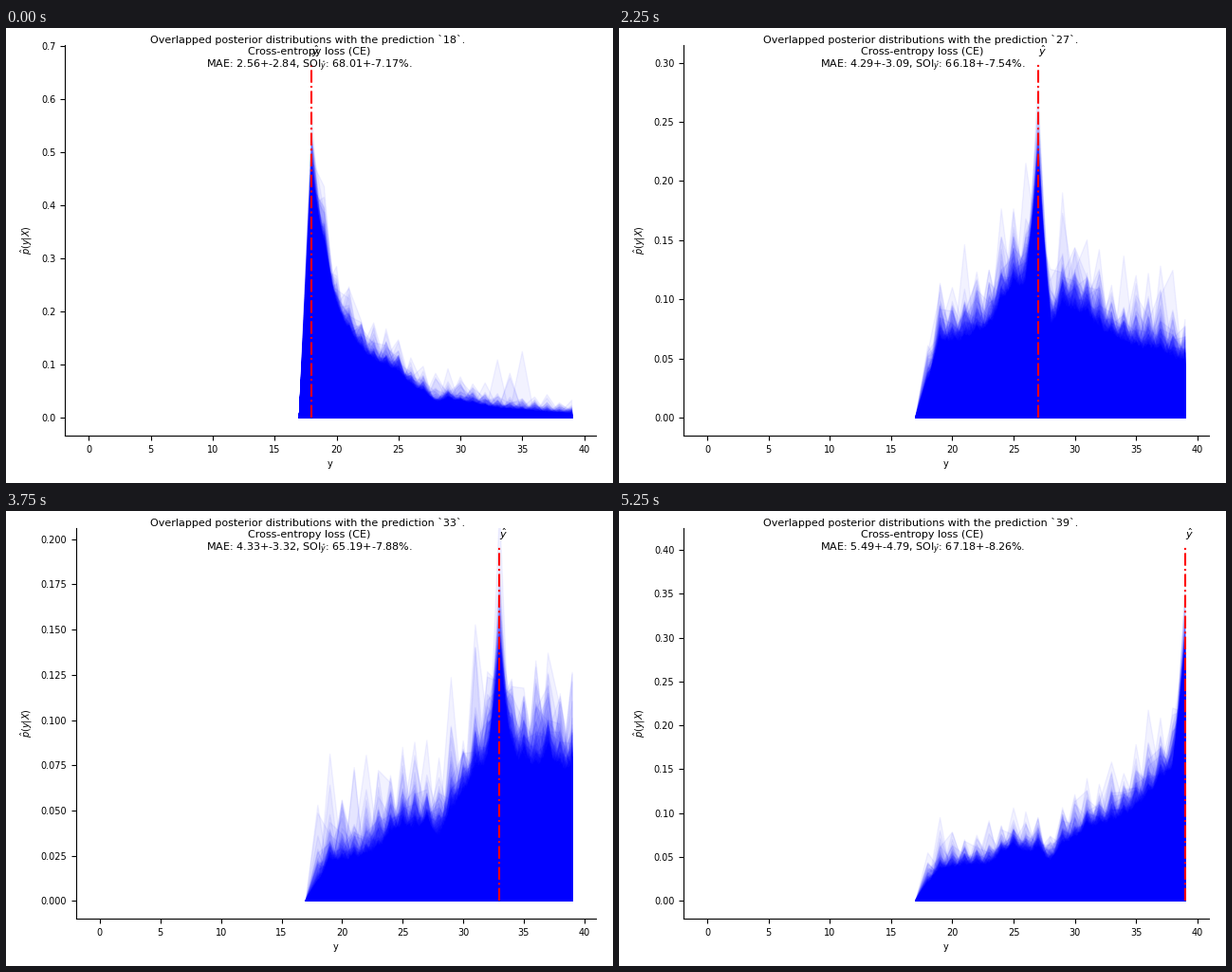
A matplotlib script for the animation above (5.5 s loop, 640 px wide and 480 px high).

```python
import numpy as np
import matplotlib.pyplot as plt
from matplotlib.animation import FuncAnimation
from matplotlib.collections import PolyCollection

WIDTH, HEIGHT, DPI = 640, 480, 100
RIGHT, TOP, BOTTOM = 622, 18, 430
FIRST, LAST = 18, 39
CURVES = 300
YS = np.arange(FIRST, LAST + 1)

KEYS = [18, 22, 25, 29, 31, 35, 39]
# Typical density beside the peak, at the low end and at the high end.
PLATEAU = [.29, .128, .14, .075, .07, .085, .15]
LOW_END = [.12, .115, .095, .02, .025, .015, .034]
HIGH_END = [.007, .02, .058, .034, .06, .085, .12]

MAE = [2.56, 3.75, 4.03, 4.56, 4.29, 4.38, 5.49]
MAE_SD = [2.84, 3.97, 3.40, 2.79, 2.93, 3.71, 4.79]
SOI = [68.01, 66.84, 66.60, 65.76, 64.33, 66.05, 67.18]
SOI_SD = [7.17, 8.75, 8.13, 6.95, 7.82, 7.95, 8.26]

# Height of the prediction line.
LINE_TOPS = {18: .668, 21: .42, 22: .3216, 25: .3955, 29: .2043,
             31: .1751, 34: .207, 35: .1964, 39: .4046}
# Values of y that are commoner or rarer for every prediction.
TEXTURE = {18: .5, 19: 1.1, 24: 1.15, 25: 1.2, 28: .72, 31: 1.1, 37: 1.1}
texture = np.array([TEXTURE.get(y, 1) for y in YS])

plt.rcParams.update({
    "font.family": "DejaVu Sans", "font.size": 8,
    "axes.labelsize": 7, "xtick.labelsize": 7, "ytick.labelsize": 7,
    "axes.spines.top": False, "axes.spines.right": False,
})


def at(prediction, values):
    return np.interp(prediction, KEYS, values)


def posterior_curves(prediction, line_top):
    """Random curves around a plateau that decays away from the peak."""
    plateau = at(prediction, PLATEAU)
    below = YS < prediction
    end = np.where(below, at(prediction, LOW_END), at(prediction, HIGH_END))
    reach = np.abs(prediction - np.where(below, FIRST + 1, LAST)) - 1
    away = (np.abs(YS - prediction) - 1) / np.maximum(reach, 1)
    body = plateau * (end / plateau) ** np.clip(away, 0, 1) ** 0.8 * texture
    body[prediction - FIRST] = 0.66 * line_top

    spread = np.minimum(0.75, 0.075 / np.sqrt(body))
    noise = np.random.default_rng(prediction).normal(size=(CURVES, len(YS)))
    return body * np.exp(spread * (noise - 0.8))


def decimals(line_top):
    return 1 if line_top > 0.41 else 2 if line_top > 0.2045 else 3


fig = plt.figure(figsize=(WIDTH / DPI, HEIGHT / DPI), dpi=DPI, facecolor="white")
ax = fig.add_axes([0.1, 0.1, 0.8, 0.8])
title = fig.text(0.5, 1 - 7 / HEIGHT, "", ha="center", va="top")
fig.text(22 / WIDTH, 1 - 224 / HEIGHT, r"$\hat{p}(y|X)$",
         ha="center", va="center", rotation=90, fontsize=7)


def draw(frame):
    prediction = FIRST + frame
    line_top = np.interp(prediction, list(LINE_TOPS), list(LINE_TOPS.values()))
    left = 56 + 6 * decimals(line_top)

    ax.clear()
    ax.set_position([left / WIDTH, 1 - BOTTOM / HEIGHT,
                     (RIGHT - left) / WIDTH, (BOTTOM - TOP) / HEIGHT])
    ax.set_xlim(-0.05 * LAST, 1.05 * LAST)
    ax.set_ylim(-0.05 * line_top, 1.05 * line_top)
    ax.set_xlabel("y")

    xs = np.concatenate([[FIRST - 1], YS, [LAST]])
    shapes = [np.column_stack([xs, np.concatenate([[0], curve, [0]])])
              for curve in posterior_curves(prediction, line_top)]
    ax.add_collection(PolyCollection(shapes, facecolors="blue", edgecolors="blue",
                                     alpha=0.05, linewidths=1), autolim=False)
    ax.plot([prediction] * 2, [0, line_top], color="red", ls="dashdot", lw=1.5)
    ax.text(prediction, line_top * 1.02, r"$\hat{y}$")

    mae, mae_sd, soi, soi_sd = (at(prediction, v) for v in (MAE, MAE_SD, SOI, SOI_SD))
    title.set_text(
        f"Overlapped posterior distributions with the prediction `{prediction}`. \n"
        "Cross-entropy loss (CE)\n"
        f"MAE: {mae:.2f}+-{mae_sd:.2f}, "
        rf"SOI$_{{\hat{{y}}}}$: {soi:.2f}+-{soi_sd:.2f}%.")
    return []


anim = FuncAnimation(fig, draw, frames=len(YS), interval=250,
                     repeat=True, repeat_delay=0)
plt.show()
```
